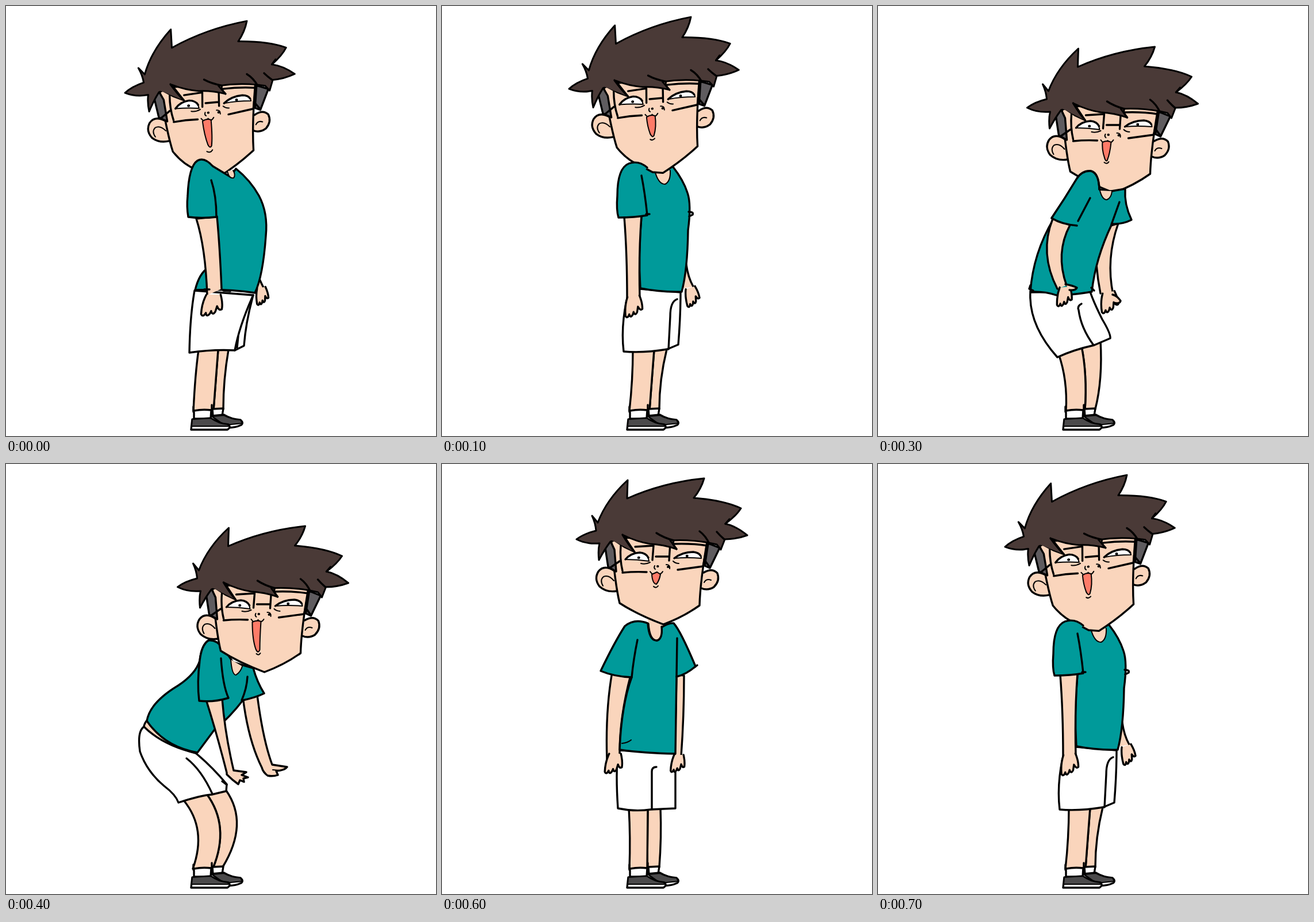
An HTML page without scripts that plays this animation: 748 px wide and 748 px high, repeating every 0.8 s.

```html
<!DOCTYPE html>
<html lang="en">
<head>
<meta charset="utf-8">
<title>Bouncing boy</title>
<style>
html, body { margin: 0; width: 100%; height: 100%; overflow: hidden; background: #fff; }
svg { display: block; width: 100vw; height: 100vh; }
path { stroke: #000; stroke-width: 3.4; stroke-linecap: round; stroke-linejoin: round; fill: none; vector-effect: non-scaling-stroke; }
.skin { fill: #fad5bc; }
.shirt { fill: #009a9a; }
.white { fill: #fff; }
.hair { fill: #4a3a37; }
.side { fill: #5f5c5f; }
.shoe { fill: #4b4a4b; }
.mouth { fill: #ff7b68; stroke-width: 2; }
.thin { stroke-width: 2; }
.flat { stroke: none; }
.pose { visibility: hidden; animation: .8s step-end infinite; }
#lean { animation-name: lean; }
#rise { animation-name: rise; }
#stand { animation-name: stand; }
#bend { animation-name: bend; }
#squat { animation-name: squat; }
@keyframes lean { 0% { visibility: visible } 12.5%, 100% { visibility: hidden } }
@keyframes rise { 0%, 25% { visibility: hidden } 12.5%, 87.5% { visibility: visible } }
@keyframes stand { 0%, 37.5%, 87.5% { visibility: hidden } 25%, 75% { visibility: visible } }
@keyframes bend { 0%, 50%, 75% { visibility: hidden } 37.5%, 62.5% { visibility: visible } }
@keyframes squat { 0%, 62.5% { visibility: hidden } 50% { visibility: visible } }
</style>
</head>
<body>
<svg viewBox="0 0 748 748">
<defs>
  <path id="hand" class="skin" d="M-12 0Q-20 14-21 32q3 6 8-2q1 8 7 1l2-4q2 8 7 1l3-9q3 8 8 5q2-10-2-24"/>
  <g id="ears">
    <path class="skin" d="M300 186Q282 174 272 187Q264 200 274 213Q286 224 304 221"/>
    <path class="thin" d="M299 203Q290 192 281 196Q274 202 280 212"/>
    <path class="skin" d="M455 189Q470 180 479 190Q484 203 473 214Q462 221 451 216"/>
    <path class="thin" d="M456 206Q460 199 468 202"/>
  </g>
  <path id="face" class="skin" d="M294 128Q301 210 309 242Q340 262 385 279Q420 266 448 246Q449 205 462 130Z"/>
  <path id="longface" class="skin" d="M294 128Q301 210 308 240Q324 264 346 275L366 288L384 291Q420 272 448 250Q449 205 462 130Z"/>
  <g id="features">
    <path class="side" d="M284 146L293 134L300 149L303 187L289 179Z"/>
    <path class="side" d="M463 138L483 146L466 181L457 177Z"/>
    <path class="white thin" d="M319 166Q328 155 344 154Q358 155 360 169Q340 166 319 166Z"/>
    <path class="white thin" d="M404 164Q418 153 437 153Q451 154 451 164Q426 162 404 164Z"/>
    <path d="M319 166Q328 155 344 154Q355 155 359 163M404 164Q418 153 437 153Q447 154 450 160"/>
    <path d="M342 163h.5M426 160h.5" style="stroke-width:4.5"/>
    <path class="thin" d="M346 173Q354 175 362 171M402 169Q406 173 412 173"/>
    <path d="M311 142Q309 165 314 186M293 180L309 169M336 144L368 142L366 167M314 189Q335 187 356 188M372 161L395 161M397 138L395 168M405 139Q435 138 461 142L454 178L410 184M456 166L466 180"/>
    <path class="thin" d="M370 177Q368 181 371 183M390 175Q397 175 396 182M362 187Q368 196 374 188Q379 195 384 187"/>
    <path d="M375 178h.5M393 179h.5" style="stroke-width:4"/>
  </g>
  <g id="hair">
    <path class="hair" d="M234 131Q247 121 268 116Q267 103 261 90L271 102Q286 62 323 28L322 60Q385 32 456 25Q451 43 438 59Q490 63 520 77Q512 90 493 104Q512 108 531 124Q512 131 492 131L485 149L478 140L464 137Q430 131 397 133L408 148Q385 140 362 139Q338 135 316 124L335 153L318 145L300 133L293 135Q283 148 273 167Q271 150 274 138Q252 140 234 131Z" style="stroke-width:3"/>
    <path class="hair" d="M294 132L316 124L335 153L306 138Z" style="stroke:none"/>
    <path d="M314 123Q325 141 335 153M373 120Q385 128 403 133Q400 139 408 148M448 117Q459 125 465 139M478 118Q483 124 491 131M493 104L500 96"/>
  </g>
  <g id="head"><use href="#ears"/><use href="#face"/><use href="#features"/><use href="#hair"/></g>
  <g id="longhead"><use href="#ears"/><use href="#longface"/><use href="#features"/><use href="#hair"/></g>
</defs>

<rect width="748" height="748" fill="#fff"/>

<g id="lean" class="pose">
  <path class="skin" d="M369 598L361 703L378 701Q378 650 387 598Z"/>
  <path class="skin" d="M335 598Q329 640 326 704L361 703L369 598Z"/>
  <path class="skin" d="M433 497L440 473Q444 482 448 490"/>
  <use href="#hand" transform="translate(444 490) rotate(-12) scale(.62 .82)"/>
  <path class="white" d="M328 495Q320 540 319 603Q360 597 398 599L414 591Q417 550 430 503Z"/>
  <path d="M430 503Q406 556 398 599M404 574L402 594"/>
  <g transform="translate(208 151) rotate(-5) translate(-235 -131)">
    <use href="#longhead"/>
    <path class="mouth" d="M364 192Q372 187 379 191Q379 222 376 236Q373 241 370 234Q365 216 364 192Z"/>
    <path class="thin" d="M367 245Q373 249 377 243"/>
  </g>
  <path class="shirt" d="M352 455Q336 465 329 494Q385 492 433 499Q447 470 452 400Q456 360 440 330Q425 303 400 283L390 297L357 277L350 300Z"/>
  <path class="skin thin" d="M385 287Q388 301 396 299Q400 294 395 286"/>
  <path class="skin" d="M350 503Q347 420 331 370L367 366Q372 420 375 492"/>
  <use href="#hand" transform="translate(361 502) scale(1.03 1.06)"/>
  <path d="M378 495L390 496M345 493L354 493"/>
  <path class="shirt" d="M360 279Q345 262 333 269Q318 279 316 330Q314 350 317 367Q340 370 366 367Q366 330 357 303"/>
</g>

<g id="rise" class="pose">
  <path class="skin" d="M369 598L361 703L378 701Q378 650 391 597Z"/>
  <path class="skin" d="M332 598Q332 650 326 704L361 703L369 598Z"/>
  <path class="skin" d="M417 492L425 450Q428 472 437 488"/>
  <use href="#hand" transform="translate(432 490) rotate(-18) scale(.7 .9)"/>
  <path class="white" d="M321 512Q311 560 316 601Q350 604 392 597L411 589Q415 540 415 498L344 492Z"/>
  <path d="M409 510Q397 514 397 540L394 597"/>
  <path class="shirt" d="M345 491Q380 498 417 497Q427 460 428 390Q434 345 427 325Q420 303 402 280L350 274L345 300L347 367Q341 430 345 491Z"/>
  <path d="M429 358Q438 358 436 363L430 366"/>
  <path class="skin thin" d="M370 286Q376 310 388 310Q398 305 397 286"/>
  <g transform="translate(222 144) rotate(-5) translate(-235 -131)">
    <use href="#longhead"/>
    <path class="mouth" d="M364 192Q372 187 379 191Q380 210 374 225Q371 229 368 222Q364 208 364 192Z"/>
    <path class="thin" d="M367 231Q371 234 375 230"/>
  </g>
  <path class="skin" d="M322 510Q322 430 317 367L347 365Q342 430 344 506"/>
  <use href="#hand" transform="translate(333 505) rotate(-8) scale(.88 1)"/>
  <path class="shirt" d="M357 281Q342 268 325 274Q305 282 305 330Q303 355 307 368Q335 368 357 364Q353 325 347 295"/>
  <path d="M355 362L361 362"/>
</g>

<g id="stand" class="pose">
  <path class="skin" d="M358 598L357 703L378 701Q382 650 380 598Z"/>
  <path class="skin" d="M325 598Q328 650 326 704L357 703L358 598Z"/>
  <path class="white" d="M306 498Q302 540 306 599Q335 605 363 601L406 599L406 502Z"/>
  <path d="M373 527Q365 527 365 535L365 600"/>
  <path class="skin" d="M405 506L408 366L421 368Q421 440 416 508"/>
  <use href="#hand" transform="translate(412 506) scale(.68 .86)"/>
  <path class="skin" d="M287 516Q284 430 296 362L328 368Q309 440 309 503"/>
  <use href="#hand" transform="translate(301 504) scale(.85 .98)"/>
  <path class="skin flat" d="M356 262L390 262L384 290L362 290Z"/>
  <path class="shirt" d="M309 497Q312 420 330 371Q300 370 276 360Q300 310 318 282Q335 268 358 277Q360 307 373 307Q383 306 382 284Q395 276 403 277Q415 290 441 352Q425 366 408 370L406 504Q350 503 309 497Z"/>
  <path class="skin" d="M359 278Q361 307 374 307Q384 304 382 283"/>
  <path d="M340 306Q333 340 330 371M409 303L408 370M439 354L444 350"/>
  <path class="thin" d="M313 486Q323 485 329 480"/>
  <use href="#head"/>
  <path class="mouth" d="M365 192L374 188L380 192Q378 203 373 209Q366 208 365 192Z"/>
  <path class="thin" d="M368 213Q372 217 376 212"/>
</g>

<g id="bend" class="pose">
  <path class="skin" d="M354 592Q364 640 360 703L378 701Q391 650 387 582Z"/>
  <path class="skin" d="M314 605Q330 650 327 704L360 703Q364 640 354 592Z"/>
  <path class="skin" d="M387 500Q382 475 380 450L395 385L418 378Q396 440 409 502"/>
  <use href="#hand" transform="translate(401 498) rotate(-12) scale(.88 .98)"/>
  <path class="skin" d="M408 502Q416 504 422 513Q420 519 411 516"/>
  <path class="white" d="M265 498Q262 555 312 611Q340 598 376 590L404 578Q405 570 390 545Q375 515 369 497Z"/>
  <path d="M354 518Q346 522 349 529Q353 560 375 590"/>
  <g transform="translate(25.5 46)">
    <use href="#head"/>
    <path class="mouth" d="M365 191Q373 187 380 191Q378 211 373 223Q370 225 368 216Q364 204 365 191Z"/>
    <path class="thin" d="M368 226Q373 230 376 225"/>
  </g>
  <path class="shirt" d="M265 497Q270 430 305 371L302 369Q325 335 346 300Q355 286 370 287Q384 290 385 319Q400 324 412 321L430 318Q428 345 441 372Q425 380 407 379Q378 440 372 497Q330 504 310 503Q290 496 265 497Z"/>
  <path d="M420 341L406 380M265 486L263 492L270 495M371 490L376 495"/>
  <path class="skin thin" d="M386 321Q390 337 398 337Q406 334 407 322"/>
  <path class="skin" d="M312 492Q280 430 304 370L334 381Q308 430 328 486"/>
  <use href="#hand" transform="translate(325 489) rotate(-4) scale(.75 .94)"/>
  <path class="skin" d="M326 484Q338 486 346 490Q344 495 333 494"/>
  <path class="shirt flat" d="M382 306Q380 287 368 287Q355 287 345 301L302 369Q320 380 346 382L369 334"/>
  <path d="M385 319Q384 290 370 287Q355 286 346 300Q325 335 302 369Q320 380 346 382M369 334L348 374"/>
</g>

<g id="squat" class="pose">
  <path class="skin" d="M349 574Q390 630 360 703L377 701Q423 625 383 568Z"/>
  <path class="skin" d="M309 585Q350 635 325 704L360 703Q390 630 349 574Z"/>
  <path class="skin" d="M245 446Q238 455 240 463L300 500Z"/>
  <path class="white" d="M240 457Q228 465 233 500Q245 535 275 560Q295 575 300 589Q340 576 358 575L383 569L384 557Q356 524 330 503Q272 489 240 457Z"/>
  <path d="M314 512Q340 532 359 574M384 558L376 552"/>
  <path class="skin" d="M445 528Q421 480 412 405L437 402Q447 480 463 523L489 527Q485 533 470 534L473 541Q464 544 455 542Q447 536 445 528Z"/>
  <path class="thin" d="M464 532L476 533"/>
  <path class="shirt" d="M245 447Q250 415 300 385Q330 365 337 342Q340 315 352 307Q365 305 378 320L395 345L430 355Q437 380 449 399Q435 406 412 411Q390 440 362 463L333 502Q276 492 245 447Z"/>
  <path d="M420 370Q419 390 410 411"/>
  <path class="skin thin" d="M391 340Q393 367 400 367Q408 362 411 352"/>
  <path class="skin" d="M384 537Q367 470 348 410L376 408Q381 470 396 533L418 536L410 541L421 545L413 547L414 553L407 550L404 557Q394 550 384 540Z"/>
  <path class="shirt flat" d="M352 307Q340 315 337 342Q332 380 336 412Q360 415 387 407Q377 385 374 338L366 308Z"/>
  <path d="M337 342Q332 380 336 412Q360 415 387 407Q377 385 374 338M337 342Q340 315 352 307Q365 305 378 320"/>
  <g transform="translate(64.5 83)">
    <use href="#head"/>
    <path class="mouth" d="M364 192Q372 188 379 191Q377 220 377 240Q374 248 370 239Q364 222 364 192Z"/>
    <path class="thin" d="M371 247Q375 251 378 246"/>
  </g>
</g>

<path class="white" d="M359 701L378 700L376 713L360 714Z"/>
<path class="white" d="M327 704Q342 701 357 703L356 718L327 718Z"/>
<path class="white" d="M358 713L379 711Q392 719 408 720Q414 725 409 729Q395 735 382 733Z"/>
<path class="shoe thin" d="M359 714L379 712Q392 719 408 720L411 726L380 729Z"/>
<path class="white" d="M322 737L324 719L356 717Q370 727 387 728Q392 733 385 737Z"/>
<path class="shoe thin" d="M323 731L324 719L356 717Q370 727 386 728L388 731Z"/>
<path d="M326 697L326 706M358 694L358 712"/>
</svg>
</body>
</html>
```
